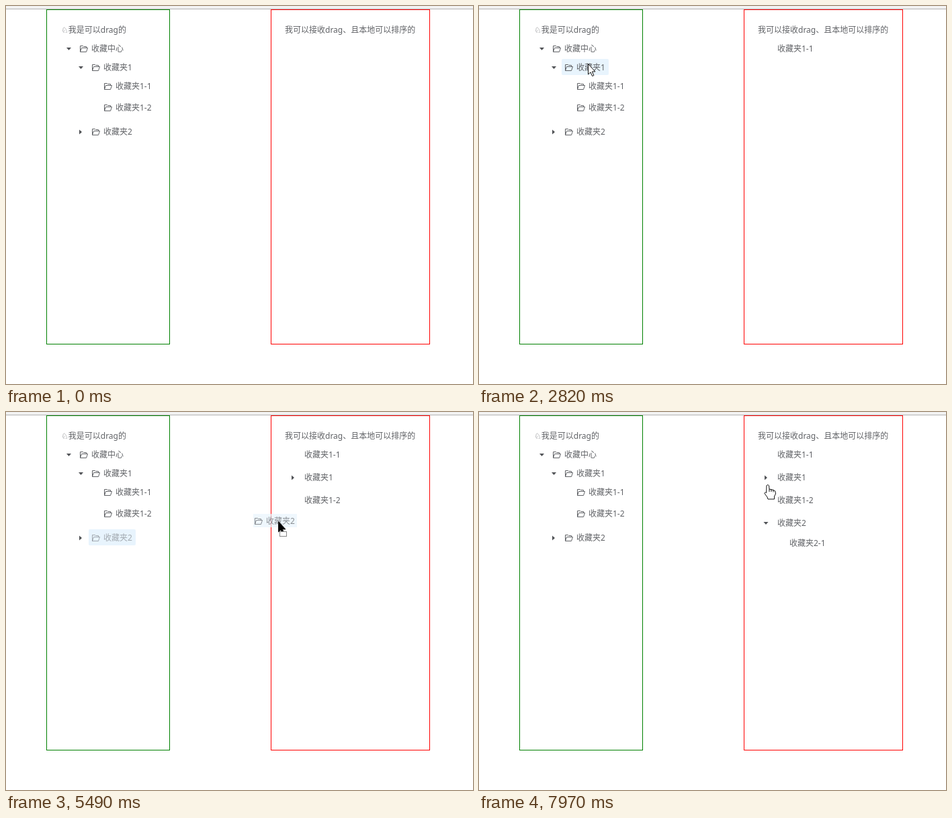
Animation of 695 by 564 pixels, one loop 8 s. Source, as an HTML page with a canvas:

```html
<!DOCTYPE html>
<html lang="zh">
<head>
<meta charset="utf-8">
<style>
html, body { margin: 0; width: 100%; height: 100%; overflow: hidden; background: #fff; }
canvas { display: block; }
</style>
</head>
<body>
<canvas id="stage" width="695" height="564"></canvas>
<script>
const ctx = document.getElementById('stage').getContext('2d');
const LOOP = 8000, FADE = 200, TICK = 81;
const FONT = '12px "Noto Sans", "Noto Sans CJK SC", "DejaVu Sans", sans-serif';

const folder = new Path2D('M.5 10.5V1.5H4.5L5.5 2.5H9.5V4.5M.5 10.5L2.5 4.5H11.5L9.5 10.5Z');
const arrow = new Path2D('M.5 .5V16L4 12.8 6.6 18.6 8.9 17.6 6.4 11.9H11Z');
const hand = new Path2D('M-2 1.8Q-.2 -.8 1.5 1.8L2 7 8 8.4 10.8 10 11.5 14 9.5 18V22H0L-1 19-5 13.6Q-5 11-2.4 12.6Z');
const knuckles = new Path2D('M2 7V11M5 7.5V11M8 8.4V11.5');

// Left tree rows: depth sets the indent, y is the row centre
const row = (label, depth, y, w) => ({ label, x: 127 + 18 * depth, y, w });
const root = row('收藏中心', 0, 64, 48);
const one = row('收藏夹1', 1, 92, 43);
const oneA = row('收藏夹1-1', 2, 120, 55);
const oneB = row('收藏夹1-2', 2, 152, 55);
const two = row('收藏夹2', 1, 188, 43);
const rows = [root, one, oneA, oneB, two];

const hovers = [
  [root, 830, 900], [one, 950, 1130], [oneA, 1240, 2120],
  [one, 2600, 3430], [oneB, 3740, 4685], [two, 5000, 6020]
];
const drags = [[oneA, 1560, 2120], [one, 2970, 3430], [oneB, 4290, 4685], [two, 5200, 6020]];
const handTimes = [[940, 1560], [2480, 2740], [3600, 4290], [5080, 5200], [6500, LOOP]];

// Pointer moves: start, end, then [step, x, y]; each begins where the last one ended
const moves = [
  [170, 570, [1, 591, 490], [3, 385, 205], [6, 97, 36]],
  [720, 1510, [5, 160, 88], [7, 168, 110], [11, 152, 115]],
  [1560, 1960, [6, 447, 103]],
  [2290, 2820, [3, 300, 118], [6, 165, 110], [8, 162, 86]],
  [2970, 3280, [5, 497, 130]],
  [3430, 4190, [4, 205, 142], [10, 170, 148]],
  [4290, 5080, [5, 473, 158], [9, 200, 200], [11, 163, 188]],
  [5160, 5950, [1, 163, 188], [5, 405, 163], [11, 475, 168]],
  [6020, 6650, [4, 455, 140], [9, 437, 159]],
  [6790, 6960, [3, 431, 163]],
  [7210, 7700, [2, 431, 163], [7, 431, 115]],
  [7860, 7970, [2, 430, 108]]
];

const during = (t, [start, end]) => t >= start && t < end;

function pointerAt(t) {
  const m = moves.findLastIndex(move => move[0] <= t);
  if (m < 0) return null;
  const [start, end, ...points] = moves[m];
  const ticks = Math.round((end - start) / TICK);
  const step = 1 + Math.min(ticks, Math.floor((t - start) * ticks / (end - start) + 1e-6));
  const next = points.findIndex(p => p[0] >= step);
  const [i, bx, by] = points[next];
  const [j, ax, ay] = points[next - 1] || (m ? [0, ...moves[m - 1].at(-1).slice(1)] : [0, bx, by]);
  const k = (step - j) / (i - j);
  return { x: Math.round(ax + (bx - ax) * k), y: Math.round(ay + (by - ay) * k) };
}

function glow(node, t) {
  const clamp = v => Math.max(0, Math.min(1, v));
  return Math.max(0, ...hovers.filter(h => h[0] === node)
    .map(([, on, off]) => Math.min(clamp((t - on) / FADE), clamp(1 - (t - off) / FADE))));
}

function text(label, x, y) {
  ctx.fillStyle = '#606266';
  ctx.fillText(label, x, y + 4);
}

function at(x, y, draw) {
  ctx.save();
  ctx.translate(x, y);
  draw();
  ctx.restore();
}

function caret(x, y, open) {
  at(x, y, () => {
    if (open) ctx.rotate(Math.PI / 2);
    ctx.fillStyle = '#505256';
    ctx.beginPath();
    ctx.moveTo(-2, -3.5);
    ctx.lineTo(-2, 3.5);
    ctx.lineTo(2, 0);
    ctx.fill();
  });
}

function item({ label, x, y }) {
  at(x - 17, y - 6, () => {
    ctx.strokeStyle = '#606266';
    ctx.stroke(folder);
  });
  text(label, x, y);
}

function panel(x, w, color) {
  ctx.strokeStyle = color;
  ctx.strokeRect(x + .5, 5.5, w - 1, 499);
}

function leftTree(t, dragged) {
  text('♘我是可以drag的', 82, 36);
  caret(93.5, 64, true);
  caret(111.5, 92, true);
  caret(111, 188, false);
  for (const node of rows) {
    ctx.globalAlpha = glow(node, t);
    ctx.fillStyle = '#e8f4fd';
    ctx.beginPath();
    ctx.roundRect(node.x - 22, node.y - 13, node.w + 27, 24, 2);
    ctx.fill();
    ctx.globalAlpha = node === dragged ? .5 : 1;
    item(node);
    ctx.globalAlpha = 1;
  }
}

function rightTree(t) {
  text('我可以接收drag、且本地可以排序的', 415, 36);
  drags.forEach(([node, , drop], i) => {
    if (t < drop) return;
    const y = 64 + 34 * i;
    if (node === one || node === two) caret(427, y, node === two && t >= 7210);
    text(node.label, 444, y);
  });
  if (t >= 7210) text('收藏夹2-1', 462, 196);
}

function ghost([node, start], p) {
  const grab = pointerAt(start - 1);
  at(p.x - grab.x, p.y - grab.y, () => {
    ctx.globalAlpha = .7;
    ctx.fillStyle = '#e8f4fd';
    ctx.fillRect(node.x - 19, node.y - 11, node.w + 22, 20);
    item(node);
  });
}

function pointer(p, t, dragging) {
  at(p.x, p.y, () => {
    const shape = handTimes.some(span => during(t, span)) ? hand : arrow;
    ctx.fillStyle = dragging ? '#000' : '#fff';
    ctx.strokeStyle = '#111';
    ctx.lineJoin = 'round';
    ctx.fill(shape);
    ctx.stroke(shape);
    if (shape === hand) ctx.stroke(knuckles);
    if (dragging) {
      ctx.fillStyle = '#fff';
      ctx.fillRect(2, 15, 11, 8);
      ctx.setLineDash([1, 1]);
      ctx.strokeRect(2.5, 15.5, 10, 7);
    }
  });
}

function frame() {
  const t = performance.now() % LOOP;
  const p = pointerAt(t);
  const drag = drags.find(([, ...span]) => during(t, span));
  ctx.font = FONT;
  ctx.lineWidth = 1;
  ctx.fillStyle = '#fff';
  ctx.fillRect(0, 0, 695, 564);
  ctx.fillStyle = '#f2f2f2';
  ctx.fillRect(0, 0, 695, 4);
  ctx.fillStyle = '#b4b4b4';
  ctx.fillRect(0, 4, 695, 1);
  panel(60, 184, '#008000');
  panel(394, 237, '#f00');
  leftTree(t, drag && drag[0]);
  rightTree(t);
  if (drag) ghost(drag, p);
  if (p) pointer(p, t, drag);
  requestAnimationFrame(frame);
}
requestAnimationFrame(frame);
</script>
</body>
</html>
```
